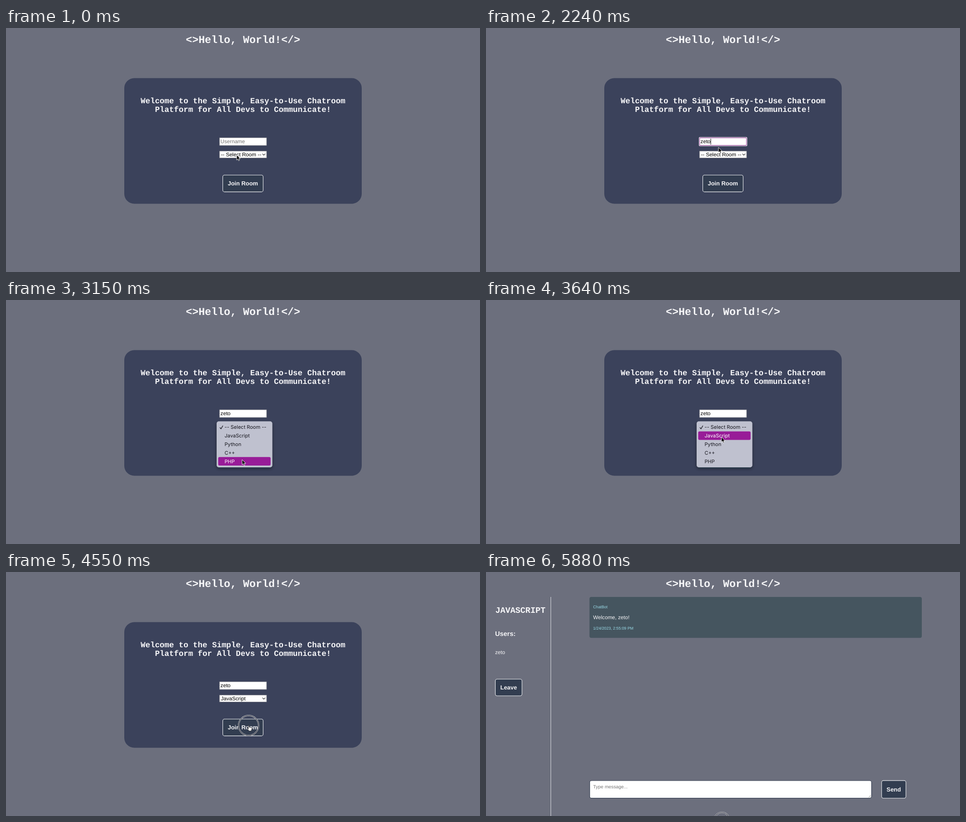
An HTML page for the animation above (5.95 s loop, 1042 by 538 pixels).

```html
<!DOCTYPE html>
<html lang="en">
<head>
<meta charset="utf-8">
<title>Chatroom</title>
<style>
  html, body { margin: 0; width: 100%; height: 100%; overflow: hidden; background: #6c6f7d; }
  svg { display: block; width: 1042px; height: 538px; }
  text { font: 11.65px "Liberation Sans", Arial, sans-serif; fill: #f6f6f8; text-rendering: geometricPrecision; }
  .mono { font-family: "Courier New", "Liberation Mono", monospace; font-weight: 700; }
  .h1 { font-size: 23.3px; }
  .h2 { font-size: 17.45px; }
  .room { font-size: 18.4px; }
  .h3 { font-size: 14.5px; font-weight: 700; }
  .mid { text-anchor: middle; }
  .button rect { fill: #323d50; stroke: #f0f1f4; stroke-width: 1.1; }
  .button text { font-size: 12.9px; font-weight: 700; text-anchor: middle; }
  .field { fill: #fff; stroke: #85858c; stroke-width: .8; }
  .ink { fill: #000; }
  .hint { fill: #757575; }
  .meta { font-size: 8.75px; fill: #9bdce9; }
  .menu text { font: 11px Inter, Roboto, sans-serif; fill: #17171f; }
  .menu text.on { fill: #fff; }
  .line { fill: none; stroke-linecap: round; stroke-linejoin: round; }
</style>
</head>
<body>
<svg viewBox="0 0 1042 538">
  <defs>
    <filter id="shadow" x="-20%" y="-20%" width="140%" height="150%">
      <feDropShadow dx="0" dy="3" stdDeviation="3.5" flood-color="#10131f" flood-opacity=".45"/>
    </filter>
  </defs>
  <rect width="1042" height="538" fill="#6c6f7d"/>
  <text class="mono h1 mid" x="521" y="33">&lt;&gt;Hello, World!&lt;/&gt;</text>

  <g id="login">
    <rect x="260" y="110.5" width="522" height="277" rx="22" fill="#3b425b"/>
    <g class="mid">
      <text class="mono h2" x="521" y="165.8">Welcome to the Simple, Easy-to-Use Chatroom</text>
      <text class="mono h2" x="521" y="185.4">Platform for All Devs to Communicate!</text>
    </g>
    <rect class="field" x="469.3" y="242" width="103.6" height="17"/>
    <g id="focus" class="line">
      <rect x="468.6" y="241.1" width="105" height="18.8" rx="1.5" stroke="#fff" stroke-width="1.2"/>
      <rect x="469.7" y="242.2" width="102.8" height="16.6" rx="1" stroke="#a653a6" stroke-width="1.2"/>
    </g>
    <text id="hint" class="hint" x="471.6" y="254.4">Username</text>
    <text id="typed" class="ink" x="471.6" y="254.4"></text>
    <rect id="caret" y="244" width="1" height="13" fill="#000"/>
    <rect class="field" x="469.3" y="271.3" width="103.6" height="15.2"/>
    <text id="choice" class="ink" x="472.4" y="283"></text>
    <path class="line" d="M564 277.6l2.8 2.8 2.8-2.8" stroke="#222" stroke-width="1.1"/>
    <g class="button">
      <rect x="476.5" y="324.2" width="88.8" height="37.2" rx="4"/>
      <text x="520.8" y="347.4">Join Room</text>
    </g>
    <g id="menu" class="menu">
      <rect x="463" y="267.5" width="122.5" height="101.5" rx="5" fill="#bfc1cf" filter="url(#shadow)"/>
      <rect id="highlight" x="466.5" width="115.2" height="18.8" rx="3" fill="#981c98"/>
      <path id="tick" class="line" d="M470.5 281.5l2.1 2.6 4-6.6" stroke-width="1.4"/>
    </g>
  </g>

  <g id="chat">
    <path d="M142.5 55V538" stroke="#dfe0e4"/>
    <text class="mono room" x="20.4" y="90">JAVASCRIPT</text>
    <text class="h3" x="20" y="140.8">Users:</text>
    <text class="user" x="20" y="180.6"></text>
    <g class="button">
      <rect x="20.5" y="236.2" width="58.6" height="36.8" rx="4"/>
      <text x="49.8" y="259.2">Leave</text>
      <rect x="869.7" y="459.9" width="53.4" height="38.8" rx="4"/>
      <text x="896.3" y="483.7">Send</text>
    </g>
    <rect x="227.5" y="55" width="730.5" height="90.3" rx="4" fill="#45555f"/>
    <text class="meta" x="235.5" y="80">ChatBot</text>
    <text x="235.5" y="104.2">Welcome, <tspan class="user"></tspan>!</text>
    <text class="meta" x="235.5" y="126.6">1/24/2023, 2:55:09 PM</text>
    <rect x="228" y="460" width="619.6" height="38.7" rx="4" fill="#fff" stroke="#333d50" stroke-width="1.2"/>
    <text class="hint" style="font-size:10.35px" x="235.6" y="477">Type message...</text>
    <path d="M841 497l5-5M844 497l2-2" stroke="#777" stroke-width=".8"/>
  </g>

  <g id="pointer">
    <g id="ring" class="line">
      <circle stroke="#e4e5ea" stroke-width="2.6"/>
      <circle stroke="#22252f" stroke-width="1.2"/>
    </g>
    <path id="arrow" d="M0 0V11.2L2.6 8.8 4.3 12.7 6.2 11.9 4.6 8.1H8.1Z" fill="#000" stroke="#fff" stroke-width=".9"/>
    <g id="beam" class="line">
      <path d="M-2.5-6.4Q0-6.4 0-4.6Q0-6.4 2.5-6.4M0-4.6V4.6M-2.5 6.4Q0 6.4 0 4.6Q0 6.4 2.5 6.4M-1.3 1.8H1.3" stroke="#111" stroke-width="1.1"/>
    </g>
    <path id="hand" d="M-.9.6Q0-.6.9.6L1.5 4.2Q2.6 3.2 3.5 4.2Q4.6 3.5 5.3 4.7Q6.9 4.4 7.1 6L6.8 9.2 5.8 12H.8L-1.8 8.2Q-3 6.2-1.4 6.2L.1 7.3Z" fill="#fff" stroke="#111" stroke-width=".8"/>
  </g>
</svg>
<script>
  const LOOP = 5950, STEP = 70;
  const USER = 'zeto';
  const ROOMS = ['-- Select Room --', 'JavaScript', 'Python', 'C++', 'PHP'];
  const KEY_TIMES = [1610, 1680, 1820, 1890];
  const ROW_TOP = 271, ROW_HEIGHT = 18.8;

  // time, x, y of the pointer's hot spot
  const PATH = [
    [0, 507, 280], [420, 508, 252.6], [2100, 508, 252.6], [2450, 515.5, 279.3],
    [2730, 515.5, 279.3], [3150, 519, 352], [3220, 519, 352], [3360, 518, 333],
    [3640, 517.5, 302.3], [3990, 517.5, 302.3], [4410, 533.3, 338.4],
    [5110, 533.3, 338.4], [5460, 763, 572], [5530, 518.5, 546], [LOOP, 518.5, 546]
  ];
  // from, to, radius
  const CLICKS = [
    [420, 560, 16], [2520, 2660, 16], [3920, 4060, 16],
    [4480, 4550, 16], [4550, 4690, 22], [5880, LOOP, 16]
  ];

  const el = id => document.getElementById(id);
  const show = (id, on) => el(id).setAttribute('visibility', on ? 'visible' : 'hidden');
  const fade = (id, value) => el(id).setAttribute('opacity', Math.max(0, Math.min(1, value)));
  const within = (t, from, to) => t >= from && t < to;

  function pointerAt(t) {
    const i = PATH.findIndex(p => p[0] > t);
    const [t0, x0, y0] = PATH[i - 1], [t1, x1, y1] = PATH[i];
    const k = (t - t0) / (t1 - t0);
    return [x0 + (x1 - x0) * k, y0 + (y1 - y0) * k];
  }

  const options = ROOMS.map((room, i) => {
    const label = document.createElementNS('http://www.w3.org/2000/svg', 'text');
    label.textContent = room;
    label.setAttribute('x', 480.6);
    label.setAttribute('y', ROW_TOP + ROW_HEIGHT * i + 13.3);
    return el('menu').appendChild(label);
  });
  document.querySelectorAll('.user').forEach(node => node.textContent = USER);

  function drawLogin(t, y) {
    const count = KEY_TIMES.filter(k => t >= k).length;
    el('typed').textContent = USER.slice(0, count);
    show('hint', !count);
    fade('focus', within(t, 770, 2520) ? (t - 700) / 210 : 0);
    fade('caret', within(t, 840, 1400) || within(t, 1610, 2380) ? 1 : 0);
    el('caret').setAttribute('x', 471.6 + (count ? el('typed').getComputedTextLength() : 0));
    el('choice').textContent = ROOMS[t < 4060 ? 0 : 1];

    fade('menu', within(t, 2660, 4200) ? (4200 - t) / 210 : 0);
    const row = t < 4060 ? Math.floor((y - ROW_TOP) / ROW_HEIGHT) : 1;
    el('highlight').setAttribute('y', ROW_TOP + ROW_HEIGHT * row);
    options.forEach((label, i) => label.classList.toggle('on', i === row));
    el('tick').setAttribute('stroke', row ? '#17171f' : '#fff');
  }

  function drawPointer(t, x, y) {
    el('pointer').setAttribute('transform', `translate(${x} ${y})`);
    const beam = within(t, 770, 1610) || within(t, 2170, 2240);
    const hidden = within(t, 1610, 2170);
    const hand = within(t, 4340, 4690);
    show('beam', beam);
    show('hand', hand);
    show('arrow', !beam && !hidden && !hand);
    const click = CLICKS.find(([from, to]) => within(t, from, to));
    show('ring', click);
    if (click) for (const circle of el('ring').children) circle.setAttribute('r', click[2]);
  }

  function draw(t) {
    const [x, y] = pointerAt(t);
    const joined = t >= 4690;
    el('login').style.display = joined ? 'none' : '';
    el('chat').style.display = joined ? '' : 'none';
    if (!joined) drawLogin(t, y);
    drawPointer(t, x, y);
  }

  let start;
  function tick(now) {
    start ??= now;
    draw(Math.floor((now - start) % LOOP / STEP) * STEP);
    requestAnimationFrame(tick);
  }
  draw(0);
  requestAnimationFrame(tick);
</script>
</body>
</html>
```
